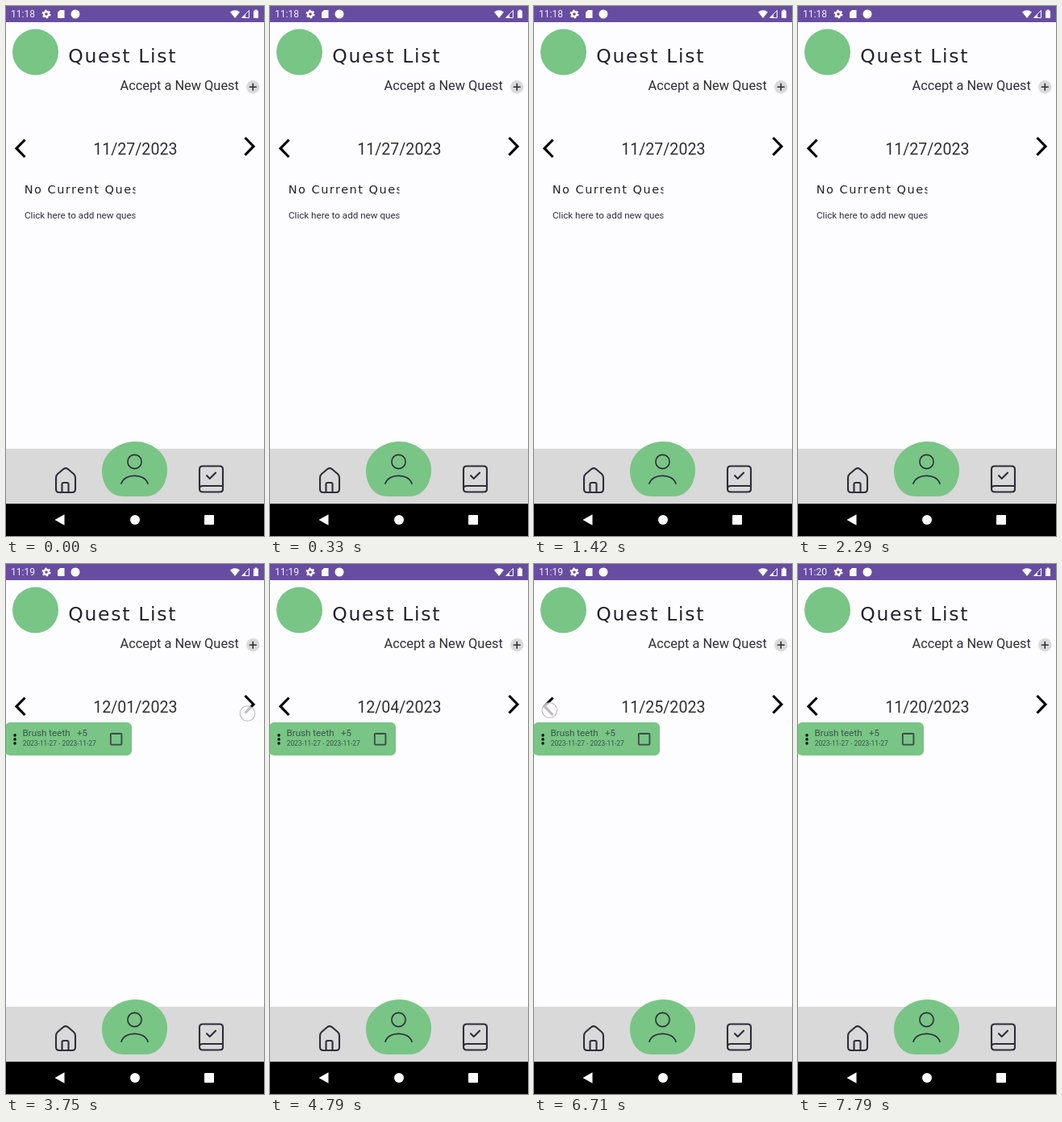
These frames come from a looping animation (320x656 px, 8 s). An HTML page:

```html
<!DOCTYPE html>
<html lang="en">
<head>
<meta charset="utf-8">
<title>Quest List</title>
<style>
  :root { --paper: #fdfcff; --green: #78c586; --grey: #d9d9d9; --ink: #2f2e38; }
  html, body { margin: 0; width: 100%; height: 100%; overflow: hidden; background: var(--paper); }
  svg { display: block; width: 100%; height: 100%; }
  text { font-family: Roboto, sans-serif; fill: var(--ink); }
  .wide { font-family: "DejaVu Sans", sans-serif; fill: #23222c; }
  .line { fill: none; stroke: var(--ink); stroke-width: 2.1; stroke-linecap: round; stroke-linejoin: round; }
  .thin { stroke-width: 1.6; }
  .chevron { fill: none; stroke: #050505; stroke-width: 3.2; }
  .green { fill: var(--green); }
  .grey { fill: var(--grey); }
  .card text { fill: #3d534a; }
</style>
</head>
<body>
<svg viewBox="0 0 320 656">
  <defs>
    <clipPath id="column"><rect x="20" y="210" width="140.5" height="60"/></clipPath>
  </defs>

  <!-- Status bar -->
  <rect width="320" height="20" fill="#674da1"/>
  <g fill="#fff">
    <text id="clock" x="6" y="14.3" font-size="12" style="fill:#f6f2fc"></text>
    <circle cx="50" cy="10" r="3" fill="none" stroke="#fff" stroke-width="2.4"/>
    <circle cx="50" cy="10" r="4.7" fill="none" stroke="#fff" stroke-width="1.6" stroke-dasharray="2.46"/>
    <path d="M67 5H72.5V15H64V8Z"/>
    <circle cx="86" cy="10" r="5.5"/>
    <path d="M278 7.5Q284 2.8 290 7.5L284 15Z"/>
    <path d="M301.5 5.5V14.5H292.5Z" fill="none" stroke="#fff"/>
    <path d="M297 10V14.5H292.5Z"/>
    <path d="M308.7 4.5H311.3V5.7H313V15H307V5.7H308.7Z"/>
  </g>

  <!-- Header -->
  <circle class="green" cx="36.5" cy="57" r="28.5"/>
  <text class="wide" x="77.3" y="70.3" font-size="23.5" letter-spacing="1.7">Quest List</text>
  <text x="141.5" y="104" font-size="16.35">Accept a New Quest</text>
  <circle class="grey" cx="306.3" cy="100.3" r="8.2"/>
  <path class="line thin" d="M302.3 100.3H310.3M306.3 96.3V104.3"/>

  <!-- Date picker -->
  <path class="chevron" d="M23.5 165.5L13 176.2L23.5 187"/>
  <path class="chevron" d="M296.5 163L307 173.7L296.5 184.5"/>
  <text id="date" x="160.3" y="184" font-size="19.6" text-anchor="middle"></text>

  <g id="empty" clip-path="url(#column)">
    <text class="wide" x="22.7" y="232" font-size="14.5" letter-spacing="1.5">No Current Quests</text>
    <text x="23" y="262.5" font-size="11.65">Click here to add new quests</text>
  </g>

  <g id="quest" class="card">
    <rect class="green" x="-1" y="196" width="157" height="41" rx="6"/>
    <circle cx="11" cy="212" r="1.8"/>
    <circle cx="11" cy="217" r="1.8"/>
    <circle cx="11" cy="222" r="1.8"/>
    <text x="20.5" y="213.2" font-size="11.6">Brush teeth</text>
    <text x="88" y="213.2" font-size="11.6">+5</text>
    <text x="20.7" y="225.2" font-size="8.4">2023-11-27 - 2023-11-27</text>
    <rect x="129.8" y="210" width="13.6" height="13.6" rx="1" fill="none" stroke="#3d4a48" stroke-width="1.9"/>
  </g>

  <circle id="touch" r="9.3" fill="#fdfcff" fill-opacity=".74" stroke="#b9b8bd" stroke-width="1.1"/>

  <!-- Tab bar -->
  <rect class="grey" y="548" width="320" height="68"/>
  <path class="green" d="M160 539C179 539 200 552 200 574C200 592 189 607 173 607H146C130 607 119 594 119 575C119 553 141 539 160 539Z"/>
  <g class="line thin">
    <circle cx="159.5" cy="564" r="8.6"/>
    <path d="M143 591.3C147 578 172 578 176 591.3"/>
  </g>
  <path class="line" d="M62 584Q62 581 64 579.3L71 573.3Q74 571 77 573.3L84 579.3Q86 581 86 584V598Q86 602 82 602H66Q62 602 62 598ZM69.5 602V592Q69.5 590 71.5 590H75.5Q77.5 590 77.5 592V602"/>
  <path class="line" d="M244 569.5H265Q269 569.5 269 573.5V598Q269 601.5 265 601.5H244Q240 601.5 240 597.5V573.5Q240 569.5 244 569.5ZM240 597.5Q240 594 244 594H269M249 581.3L252.7 585L260 577.7"/>

  <!-- System navigation -->
  <rect y="616" width="320" height="40"/>
  <g fill="#fff">
    <path d="M60.5 636L72.5 629.3V642.7Z"/>
    <circle cx="160" cy="636" r="6"/>
    <rect x="246" y="630" width="12" height="12" rx="1"/>
  </g>
</svg>
<script>
  const LOOP = 8000, TAP_DELAY = 40, TAP_LENGTH = 110;
  const FIRST_TAP = 3130, NEXT_MINUTE = 7250;
  const bursts = [
    { start: FIRST_TAP, period: 185, taps: 7, step: 1, x: 299.5, y: 185 },
    { start: 5250, period: 172, taps: 14, step: -1, x: 19.3, y: 181 }
  ];
  const [clock, date, empty, quest, touch] =
    ['clock', 'date', 'empty', 'quest', 'touch'].map(id => document.getElementById(id));

  const show = (element, visible) => element.setAttribute('visibility', visible ? 'visible' : 'hidden');
  const pad = n => String(n).padStart(2, '0');

  function formatDay(offset) {
    const day = new Date(2023, 10, 27 + offset);
    return `${pad(day.getMonth() + 1)}/${pad(day.getDate())}/${day.getFullYear()}`;
  }

  function draw(t) {
    let offset = 0, touching = false;
    for (const { start, period, taps, step, x, y } of bursts) {
      const elapsed = t - start;
      const done = Math.floor((elapsed - TAP_DELAY) / period) + 1;
      offset += step * Math.max(0, Math.min(taps, done));
      if (elapsed >= 0 && elapsed < period * taps && elapsed % period < TAP_LENGTH) {
        touching = true;
        touch.setAttribute('cx', x);
        touch.setAttribute('cy', y);
      }
    }
    const started = t >= FIRST_TAP;
    show(touch, touching);
    show(empty, !started);
    show(quest, started);
    date.textContent = formatDay(offset);
    clock.textContent = t >= NEXT_MINUTE ? '11:20' : started ? '11:19' : '11:18';
  }

  function tick() {
    draw(performance.now() % LOOP);
    requestAnimationFrame(tick);
  }
  tick();
</script>
</body>
</html>
```
